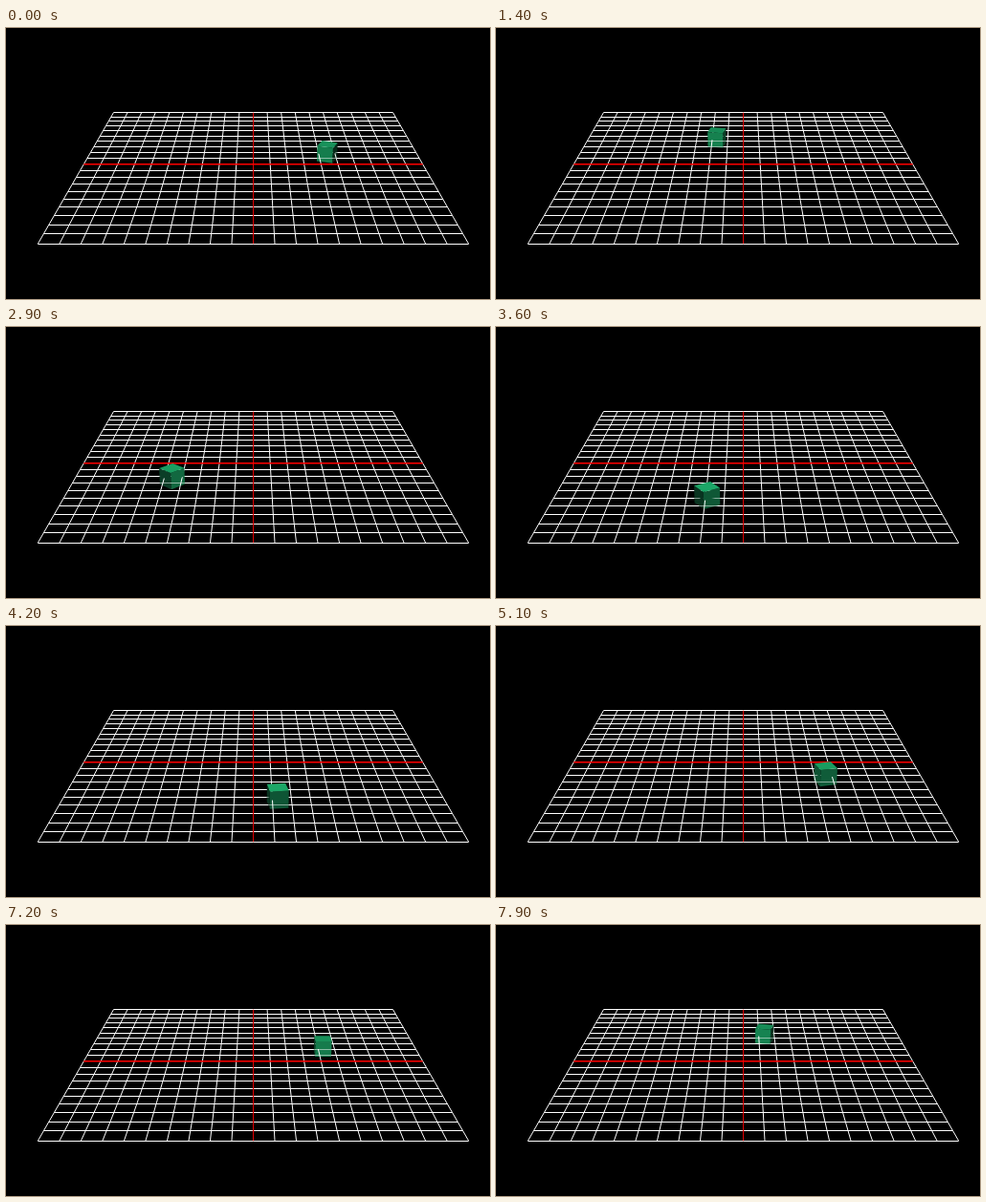
An HTML page with a canvas for the animation above (8000 ms loop, 506 by 284 pixels).

```html
<!DOCTYPE html>
<html lang="en">
<head>
<meta charset="utf-8">
<title>Cube circling on a grid</title>
<style>
  html, body { margin: 0; width: 100%; height: 100%; overflow: hidden; background: #000; }
  canvas { display: block; }
</style>
</head>
<body>
<canvas id="stage" width="506" height="284"></canvas>
<script>
const ctx = document.getElementById('stage').getContext('2d');
const LOOP = 8000, STEP = 100;

// Camera looks at the centre of a grid spanning -1..1; x right, y up, z near.
const FOCAL = 772.6, DIST = 4.36, SIN = 0.3704, COS = 0.929;
const CENTER_X = 258.5, CENTER_Y = 142.8;
const CAMERA = [0, DIST * SIN, DIST * COS];
const LIGHT = [0, 1.8, 1.2];
const HALF = 0.05, RADIUS = 0.5;

// time in seconds, orbit and spin in degrees
const KEYS = [
  [0, 24.3, -22], [1.4, 110, 80], [2.9, 203.5, 226], [4.2, 285, 368],
  [5.1, 338.8, 466], [6.399, 338.8, 466], [6.4, 340.4, 363], [8, 440.2, 537]
];

const rad = deg => deg * Math.PI / 180;
const sub = (a, b) => a.map((v, i) => v - b[i]);
const dot = (a, b) => a.reduce((sum, v, i) => sum + v * b[i], 0);

function project([x, y, z]) {
  const k = FOCAL / (DIST - z * COS - y * SIN);
  return [CENTER_X + x * k, CENTER_Y - (y * COS - z * SIN) * k];
}

function poseAt(t) {
  const i = KEYS.findIndex(key => key[0] > t);
  const a = KEYS[i - 1], b = KEYS[i];
  const p = (t - a[0]) / (b[0] - a[0]);
  return [1, 2].map(j => rad(a[j] + (b[j] - a[j]) * p));
}

function trace(points) {
  ctx.beginPath();
  points.forEach(p => ctx.lineTo(...project(p)));
}

function strokeLine(from, to, color, width = 1) {
  ctx.strokeStyle = color;
  ctx.lineWidth = width;
  ctx.beginPath();
  ctx.moveTo(...from);
  ctx.lineTo(...to);
  ctx.stroke();
}

function drawRow(z, color) {
  const [x0, y] = project([-1, 0, z]), [x1] = project([1, 0, z]);
  const snapped = Math.floor(y) + 0.5;
  strokeLine([x0, snapped], [x1, snapped], color);
}

function drawColumn(x, color) {
  strokeLine(project([x, 0, -1]), project([x, 0, 1]), color);
}

function drawGrid(rowAlpha) {
  for (let i = -10; i <= 10; i++) {
    if (!i) continue;
    drawColumn(i / 10, '#fff');
    drawRow(i / 10, `rgba(255,255,255,${rowAlpha})`);
  }
  drawColumn(0, '#e00000');
  strokeLine(project([-1, 0, 0]), project([1, 0, 0]), `rgba(255,0,0,${rowAlpha})`, 1.6);
}

function fillFace(points, middle, normal) {
  const ray = sub(LIGHT, middle);
  const lit = Math.max(0, dot(ray, normal)) / Math.hypot(...ray);
  const shade = 0.22 + 0.78 * lit;
  ctx.fillStyle = `rgb(${[30, 178, 110].map(c => Math.round(c * shade))})`;
  trace(points);
  ctx.fill();
}

function drawCube(orbit, spin) {
  const cx = RADIUS * Math.cos(orbit), cz = -RADIUS * Math.sin(orbit);
  const top = [], sides = [];
  for (let i = 0; i < 4; i++) {
    const a = spin + i * Math.PI / 2, s = Math.sin(a), c = Math.cos(a);
    const corner = (side, y) => [cx + HALF * (s + side * c), y, cz + HALF * (c - side * s)];
    const wall = (y0, y1) => [corner(-1, y0), corner(1, y0), corner(1, y1), corner(-1, y1)];
    const middle = [cx + HALF * s, 0, cz + HALF * c], normal = [s, 0, c];
    top.push(corner(1, HALF));
    if (dot(sub(CAMERA, middle), normal) > 0) {
      fillFace(wall(-HALF, HALF), middle, normal);
      sides.push(wall(-HALF, 0));
    }
  }
  fillFace(top, [cx, HALF, cz], [0, 1, 0]);

  // The grid passes in front of the sunken half.
  for (const wall of sides) {
    ctx.save();
    trace(wall);
    ctx.clip();
    drawGrid(0.5);
    ctx.restore();
  }
}

function render(now) {
  const t = Math.floor(now % LOOP / STEP) * STEP / 1000;
  ctx.fillStyle = '#000';
  ctx.fillRect(0, 0, 506, 284);
  drawGrid(1);
  drawCube(...poseAt(t));
}

let start;
function tick(now) {
  start ??= now;
  render(now - start);
  requestAnimationFrame(tick);
}
render(0);
requestAnimationFrame(tick);
</script>
</body>
</html>
```
